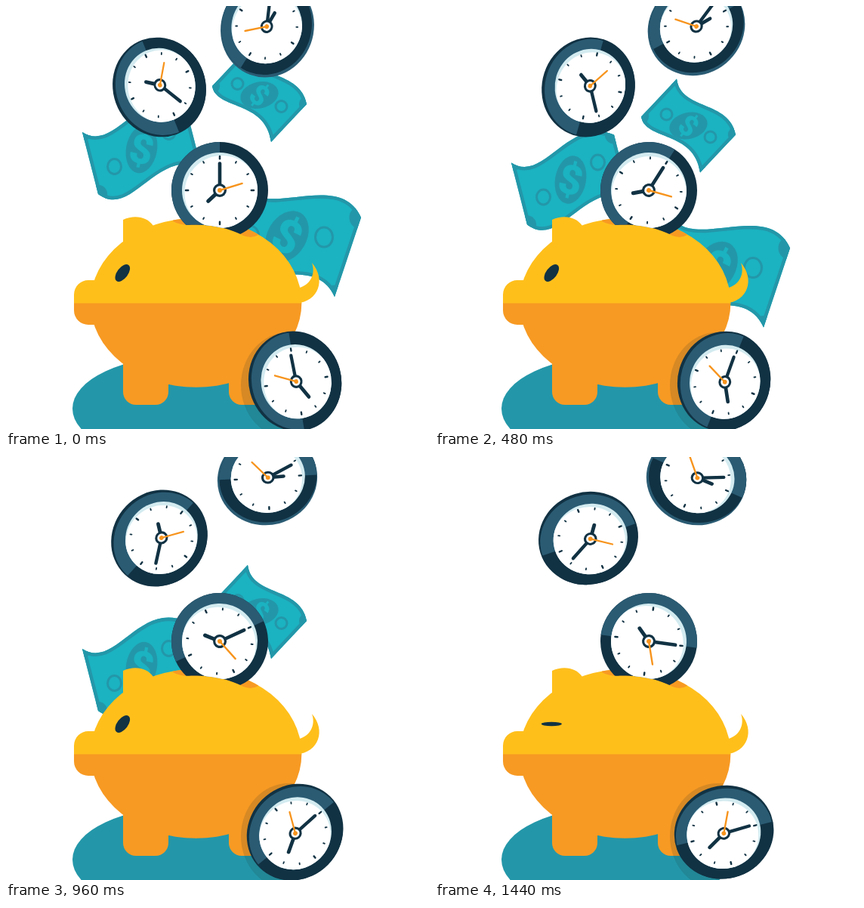
Animation, 560 px wide and 560 px high, one loop 1920 ms. Source, as an HTML page with a canvas:

```html
<!DOCTYPE html>
<html lang="en">
<head>
<meta charset="utf-8">
<title>Time is money</title>
<style>
html, body { margin: 0; width: 100%; height: 100%; overflow: hidden; background: #fff; }
canvas { display: block; width: 560px; height: 560px; }
</style>
</head>
<body>
<canvas id="stage" width="560" height="560"></canvas>
<script>
const ctx = document.getElementById('stage').getContext('2d');
const STEP = 480, STEPS = 4;
const NAVY = '#113243', BLUE = '#2a5b73', ICE = '#d3ebf0';
const YELLOW = '#ffbf1b', ORANGE = '#f79a23', HAND = '#f7941d';
const TEAL = '#2397a9', AQUA = '#1bb2c1';
const rad = deg => deg * Math.PI / 180;

// Angles are clockwise from twelve; hands and offsets are relative to the ring's colour split.
const fallingClocks = [
  { x: 203, y: 107.5, split: -22, spin: [0, 38, 64, 93], axis: 2, rim: NAVY,
    shift: [90, 2], hub: [38, 2.9], hands: [149, 303, 34], hour: 20, tick: -4 },
  { x: 346, y: 28.7, split: 32, spin: [0, 30, 55, 82], axis: -12, rim: BLUE,
    shift: [-60, 2], hub: [-60, 1.7], hands: [-26, -1, 228], hour: 21, tick: 0 }
];
const frontClock = { x: 382.6, y: 496.7, split: -9, spin: [0, 31, 59.5, 85], axis: -6, rim: NAVY,
  shift: [90, 2], hub: [113, 1.6], hands: [358, 148, 293], hour: 27, tick: 0 };
const slotClock = { x: 283, y: 244, split: 0, spin: [0, 32.6, 65.2, 97.8], axis: 0, flat: true,
  shift: [0, 0], hub: [0, 0], hands: [0, 227, 73], hour: 21, tick: 0 };

// top: start, two controls and end of the upper edge; side: vector to the lower edge;
// bow: how far the lower edge sags below a copy of the upper one.
const bills = [
  { top: [101, 167, 145, 195, 175, 105, 237, 130], side: [21, 82], bow: 5,
    oval: [20.5, 32, 10], sign: [54, 13], ring: [9, 10], gap: [36, -23], steps: 3 },
  { top: [320, 56, 325, 98, 390, 84, 398, 130], side: [-47, 50], bow: -10,
    oval: [25.5, 17.5, -13], sign: [38, 38], ring: [7.5, 7.5], gap: [29, 15], steps: 3 },
  { top: [309, 225, 324, 296, 440, 210, 470, 280], side: [-35, 105], bow: 0,
    oval: [26, 36, 30], sign: [62, 27], ring: [11.5, 13], gap: [49, 1], steps: 2 }
];
const drop = [0, 40.5, 87];

function layer(draw) {
  ctx.save();
  draw();
  ctx.restore();
}

function ellipse(x, y, rx, ry, color, turn = 0) {
  ctx.beginPath();
  ctx.ellipse(x, y, rx, ry, rad(turn), 0, 2 * Math.PI);
  if (color) {
    ctx.fillStyle = color;
    ctx.fill();
  }
}

function ray(angle, from, to, width, color) {
  const s = Math.sin(rad(angle)), c = -Math.cos(rad(angle));
  ctx.beginPath();
  ctx.moveTo(s * from, c * from);
  ctx.lineTo(s * to, c * to);
  ctx.lineWidth = width;
  ctx.strokeStyle = color;
  ctx.stroke();
}

function shiftBy([angle, dist]) {
  ctx.translate(Math.sin(rad(angle)) * dist, -Math.cos(rad(angle)) * dist);
}

function drawFace(c) {
  ellipse(0, 0, 50, 50, ICE);
  layer(() => {
    ctx.clip();
    ellipse(3, 3.4, 49.5, 49.5, '#fff');
  });
  ctx.lineCap = 'round';
  for (let i = 0; i < 12; i++) {
    const major = i % 3 === 0;
    ray(i * 30 + c.tick, 41.8, major ? 45 : 43.8, major ? 2.5 : 1.9, NAVY);
  }
  const [minute, hour, second] = c.hands;
  ray(minute, 6, 35.5, 4.6, NAVY);
  ray(hour, 6, c.hour, 5, NAVY);
  ellipse(0, 0, 9, 9, NAVY);
  ellipse(0, 0, 5.8, 5.8, '#fff');
  ray(second, 0, 31, 2.4, HAND);
  ellipse(0, 0, 3, 3, HAND);
}

function drawClock(c, step) {
  const rx = c.flat ? 64 : 59.3, ry = c.flat ? 64 : 64.8;
  layer(() => {
    ctx.translate(c.x, c.y);
    ctx.rotate(rad(c.split + c.spin[step]));
    if (!c.flat) ellipse(0, 0, 61.3, 66.4, c.rim, c.axis);
    layer(() => {
      shiftBy(c.shift);
      ellipse(0, 0, rx, ry, NAVY, c.axis);
      ctx.clip();
      ctx.fillStyle = BLUE;
      ctx.fillRect(-80, -80, 80, 160);
    });
    shiftBy(c.hub);
    if (!c.flat) {
      ctx.rotate(rad(c.axis));
      ctx.scale(0.93, 0.985);
      ctx.rotate(rad(-c.axis));
    }
    drawFace(c);
  });
}

function drawBill(b, step) {
  if (step >= b.steps) return;
  const [x0, y0, x1, y1, x2, y2, x3, y3] = b.top;
  const [vx, vy] = b.side;
  const low = vy + b.bow;
  const [size, lean] = b.sign;

  layer(() => {
    ctx.translate(0, drop[step]);
    ctx.beginPath();
    ctx.moveTo(x0, y0);
    ctx.bezierCurveTo(x1, y1, x2, y2, x3, y3);
    ctx.lineTo(x3 + vx, y3 + vy);
    ctx.bezierCurveTo(x2 + vx, y2 + low, x1 + vx, y1 + low, x0 + vx, y0 + vy);
    ctx.closePath();
    ctx.fillStyle = AQUA;
    ctx.fill();
    ctx.clip();
    ctx.lineWidth = 9;
    ctx.strokeStyle = TEAL;
    ctx.stroke();
    const corner = b.ring[0] * 1.35;
    for (const [x, y] of [[x0, y0], [x3, y3]]) {
      ellipse(x, y, corner, corner, TEAL);
      ellipse(x + vx, y + vy, corner, corner, TEAL);
    }

    ctx.translate((x0 + x3 + vx) / 2, (y0 + y3 + vy) / 2);
    ctx.lineWidth = 3;
    for (const dir of [-1, 1]) {
      ellipse(dir * b.gap[0], dir * b.gap[1], ...b.ring);
      ctx.stroke();
    }
    const [rx, ry, tilt] = b.oval;
    ellipse(0, 0, rx, ry, TEAL, tilt);
    ctx.rotate(rad(lean));
    ctx.fillStyle = AQUA;
    ctx.font = `900 ${size}px Roboto, sans-serif`;
    ctx.textAlign = 'center';
    ctx.fillText('$', 0, size * 0.35);
  });
}

const ground = new Path2D();
ground.ellipse(238, 533, 150, 70, 0, 0, 2 * Math.PI);

const body = new Path2D();
body.ellipse(251.6, 392.8, 139.8, 112, 0, 0, 2 * Math.PI);

const pig = new Path2D(body);
const part = (...box) => {
  const p = new Path2D();
  p.roundRect(...box);
  pig.addPath(p);
};
part(90, 363, 60, 59, 19);
part(155, 430, 60, 98, [0, 0, 17, 17]);
part(295, 430, 60, 98, [0, 0, 17, 17]);
pig.addPath(new Path2D('M155 330 V283 C170 276 187 279 195 291 L205 330 Z'));
pig.addPath(new Path2D('M405 340 C424 362 414 391 385 393.5 V374 C404 370 410 354 405 340 Z'));

const slotEdge = 'Q232 291 245 289.5 C272 289 298 295 312 303 Q324 309 334 303';
const slot = new Path2D('M221 285 ' + slotEdge + ' V265 H221 Z');
const aboveSlot = new Path2D('M0 285 H221 ' + slotEdge + ' H560 V0 H0 Z');

function drawPig(step) {
  layer(() => {
    ctx.clip(pig);
    ctx.fillStyle = YELLOW;
    ctx.fillRect(80, 260, 350, 134);
    ctx.fillStyle = ORANGE;
    ctx.fillRect(80, 393.5, 350, 140);
  });
  layer(() => {
    ctx.clip(body);
    ctx.fillStyle = ORANGE;
    ctx.fill(slot);
  });
  if (step === 3) ellipse(154.3, 353.5, 13.5, 2.7, NAVY);
  else ellipse(154.3, 353.5, 13.2, 7.2, NAVY, -53);
}

function drawShadow() {
  const area = new Path2D(pig);
  area.addPath(ground);
  layer(() => {
    ctx.clip(area);
    ellipse(374, 502, 63, 70, 'rgba(30, 40, 40, 0.15)');
  });
}

function draw(step) {
  ctx.fillStyle = '#fff';
  ctx.fillRect(0, 0, 560, 560);
  bills.forEach(b => drawBill(b, step));
  fallingClocks.forEach(c => drawClock(c, step));
  ctx.fillStyle = TEAL;
  ctx.fill(ground);
  drawPig(step);
  layer(() => {
    ctx.clip(aboveSlot);
    drawClock(slotClock, step);
  });
  drawShadow();
  drawClock(frontClock, step);
}

function tick() {
  draw(Math.floor(performance.now() / STEP) % STEPS);
  requestAnimationFrame(tick);
}
tick();
</script>
</body>
</html>
```
